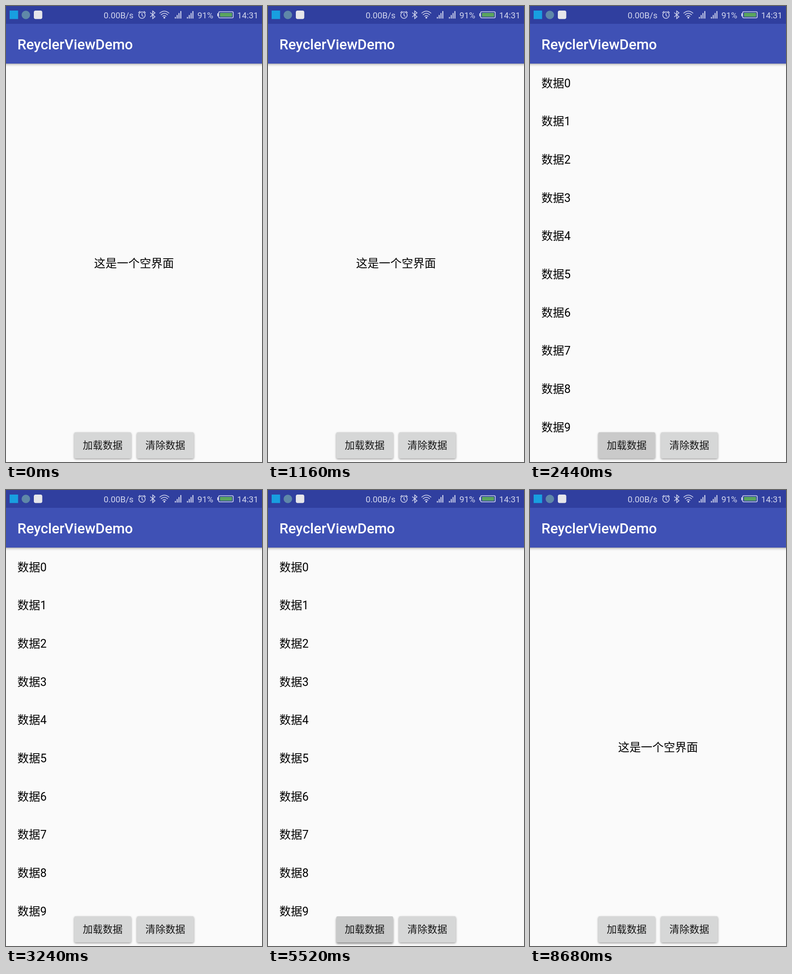
Write an HTML page that moves like this. It is 561 px wide and 998 px high and loops after 9.08 s.

```html
<!DOCTYPE html>
<html lang="zh-CN">
<head>
<meta charset="utf-8">
<title>ReyclerViewDemo</title>
<style>
html, body { margin: 0; width: 100%; height: 100%; overflow: hidden; background: #fafafa; }
svg { display: block; width: 100vw; height: 100vh; }
text { font-family: Roboto, "Noto Sans CJK SC", "Noto Sans CJK", sans-serif; }
.status { font-size: 18.7px; fill: #d3d7ee; }
.line { fill: none; stroke: #d3d7ee; stroke-width: 1.6; }
.item { font-size: 25px; fill: #000; }
.label { font-size: 21.8px; fill: #161616; text-anchor: middle; }
</style>
</head>
<body>
<svg viewBox="0 0 561 998" xmlns="http://www.w3.org/2000/svg">
  <defs>
    <filter id="soft" x="-20%" y="-40%" width="140%" height="180%"><feGaussianBlur stdDeviation="2"/></filter>
    <linearGradient id="barShade" x2="0" y2="1">
      <stop offset="0" stop-opacity=".3"/>
      <stop offset=".4" stop-opacity=".1"/>
      <stop offset="1" stop-opacity="0"/>
    </linearGradient>
  </defs>
  <rect width="561" height="998" fill="#fafafa"/>
  <text id="empty" class="item" x="280.5" y="572" text-anchor="middle">这是一个空界面</text>
  <g id="list"></g>
  <g id="buttons"></g>

  <rect y="126" width="561" height="7" fill="url(#barShade)"/>
  <rect y="38" width="561" height="88" fill="#3f51b5"/>
  <rect width="561" height="39" fill="#303f9f"/>
  <text x="25" y="94.5" font-size="31.2" font-weight="500" fill="#fff">ReyclerViewDemo</text>

  <rect x="8" y="10" width="18.5" height="18.5" fill="#189fe0"/>
  <circle cx="43.5" cy="19.5" r="9.3" fill="#5f88a8"/>
  <rect x="61" y="10" width="18.5" height="18.5" rx="4" fill="#e6e6ea"/>

  <text class="status" x="214" y="27">0.00B/s</text>
  <g class="line">
    <circle cx="298" cy="20" r="7"/>
    <path d="M298 15.5V20.5L301 23M290 15L294 11.3M306 15L302 11.3"/>
    <path d="M316 14.5L326.500 23.500L321.500 27.500V11L326.500 15L316 24"/>
    <path d="M336.500 16Q347 6.500 357.500 16M339.500 19.500Q347 12.500 354.500 19.500M342.800 23Q347 19 351.200 23"/>
    <rect x="466" y="12.500" width="32" height="13.500" rx="2.500"/>
  </g>
  <circle cx="347" cy="25.500" r="2" fill="#d3d7ee"/>
  <g id="signal" fill="#d3d7ee"></g>
  <text class="status" x="419.500" y="27">91%</text>
  <rect x="463" y="16" width="2.500" height="6.500" fill="#d3d7ee"/>
  <rect x="469" y="15" width="26.500" height="8.500" fill="#5ba55e"/>
  <text class="status" x="506.500" y="27">14:31</text>
</svg>
<script>
const LOOP = 9080, CLICK = 200, FADE_END = 880;
const presses = [
  { at: 2080, button: 0 },
  { at: 3760, button: 1 },
  { at: 5240, button: 0 },
  { at: 6560, button: 1 }
];
const byId = id => document.getElementById(id);
const clamp = v => Math.max(0, Math.min(1, v));
const easeOut = v => 1 - (1 - clamp(v)) ** 2;

function add(parent, tag, attrs, text) {
  const el = document.createElementNS("http://www.w3.org/2000/svg", tag);
  for (const key in attrs) el.setAttribute(key, attrs[key]);
  if (text) el.textContent = text;
  return parent.appendChild(el);
}

for (let i = 0; i < 10; i++) {
  add(byId("list"), "text", { class: "item", x: 25, y: 177.7 + i * 83.67 }, "数据" + i);
}
for (const left of [370, 396.5]) {
  for (let i = 0; i < 4; i++) {
    const h = 3.5 + i * 4.3;
    add(byId("signal"), "rect", { x: left + i * 4, y: 27.5 - h, width: 2.2, height: h });
  }
}

function makeButton(x, label, index) {
  const g = add(byId("buttons"), "g", {});
  const box = { x, y: 933, width: 124.5, height: 57, rx: 3 };
  const shadow = add(g, "rect", { ...box, filter: "url(#soft)" });
  add(g, "rect", { ...box, fill: "#d6d7d7" });
  const clip = add(g, "clipPath", { id: "clip" + index });
  add(clip, "rect", box);
  const tint = add(g, "rect", box);
  const ripple = add(g, "circle", { cx: x + 62, cy: 961, "clip-path": `url(#clip${index})` });
  add(g, "text", { class: "label", x: x + 62.2, y: 969 }, label);
  return { shadow, tint, ripple };
}
const buttons = [makeButton(149.7, "加载数据", 0), makeButton(287, "清除数据", 1)];

function paintButton(button, age) {
  const active = age >= 0 && age < FADE_END;
  const fade = active ? 1 - clamp((age - CLICK) / (FADE_END - CLICK)) : 0;
  const lift = active ? clamp(age / 100) * (1 - clamp((age - CLICK) / 160)) : 0;
  button.shadow.setAttribute("transform", `translate(0 ${1.8 + lift * 3})`);
  button.shadow.setAttribute("opacity", 0.38 + lift * 0.08);
  button.tint.setAttribute("opacity", 0.035 * fade * clamp(age / 120));
  button.ripple.setAttribute("r", active ? 70 * easeOut(age / 320) : 0);
  button.ripple.setAttribute("opacity", 0.04 * fade);
}

function draw(t) {
  let loaded = false;
  const ages = [-1, -1];
  for (const { at, button } of presses) {
    if (t >= at) ages[button] = t - at;
    if (t >= at + CLICK) loaded = button === 0;
  }
  byId("list").style.display = loaded ? "" : "none";
  byId("empty").style.display = loaded ? "none" : "";
  buttons.forEach((b, i) => paintButton(b, ages[i]));
}

const start = performance.now();
function tick() {
  draw((performance.now() - start) % LOOP);
  requestAnimationFrame(tick);
}
tick();
</script>
</body>
</html>
```
